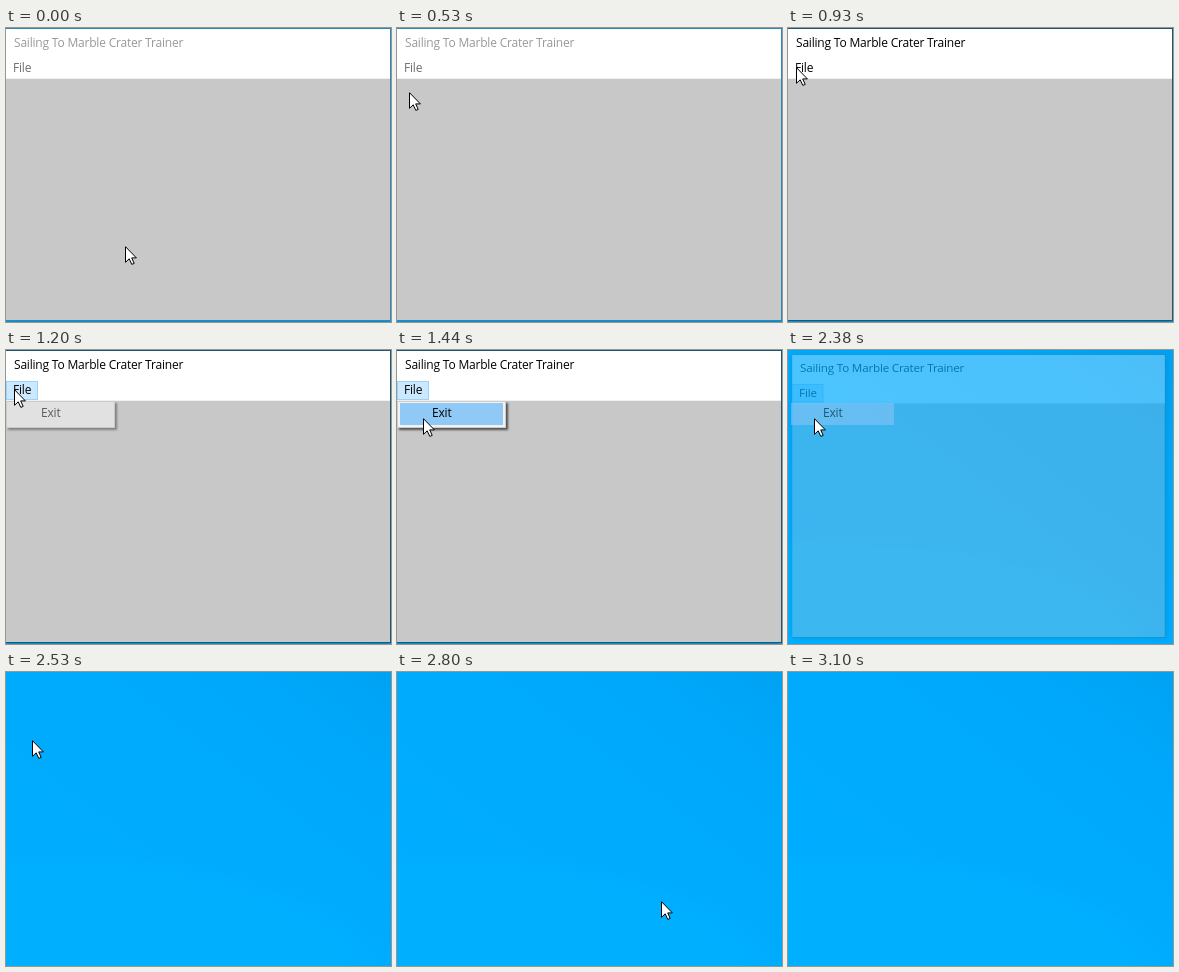
Recreate the animation shown at these times as an HTML page. Size 385 px wide and 294 px high, loop 3660 ms.

```html
<!DOCTYPE html>
<html lang="en">
<head>
<meta charset="utf-8">
<title>Closing a window</title>
<style>
html, body { margin: 0; width: 100%; height: 100%; overflow: hidden; }
body {
  position: relative;
  font: 12px/16px "Open Sans", "Noto Sans", sans-serif;
  color: #000;
  background:
    radial-gradient(ellipse 350px 132px at 50px 312px, #00b0ff 80%, #00b0ff00),
    linear-gradient(to top right, #00adff, #00abfe 45%, #00a8fb 80%, #00a2f3);
}
div, svg { position: absolute; box-sizing: border-box; }
.window, .bar, .title, .file, .frame, .item, .cursor {
  animation: 3660ms step-end infinite;
}

.window {
  left: 0; top: 0; width: 385px; height: 293px;
  background: #c8c8c8;
  border: 1px solid; border-left: 0;
  box-shadow: 0 1px 7px #0005;
  animation-name: window;
}
.bar {
  left: 0; top: 0; width: 384px; height: 50px;
  background: #fff;
  border-bottom: 1px solid #f0f0f0;
}
.title {
  left: 8px; top: 6px;
  white-space: nowrap; letter-spacing: -.2px;
  animation-name: title;
}
.file {
  left: 0; top: 30px; width: 32px; height: 19px;
  padding-left: 6px;
  border: 1px solid transparent;
  letter-spacing: -.2px;
  animation-name: file;
}
.frame {
  left: 0; top: 51px; width: 109px; height: 27px;
  border: 1px solid;
  box-shadow: 2px 2px 2px #0009;
  animation-name: frame;
}
.item {
  left: 3px; top: 53px; width: 103px; height: 22px;
  padding: 2px 0 0 32px;
  letter-spacing: -.2px;
  animation-name: item;
}
.cursor { left: 0; top: 0; animation-name: cursor; }

@keyframes window {
  0% { border-color: #2b8ab5; opacity: 1; transform: none; }
  25.409% { border-color: #1c5873; opacity: 1; transform: none; }
  65.027% { border-color: #1c5873; opacity: .3; transform: translate(-1.5px, -.5px) scale(.97); }
  69.125%, 100% { border-color: #1c5873; opacity: 0; transform: none; }
}
@keyframes title {
  0% { color: #999; }
  25.409%, 100% { color: #000; }
}
@keyframes file {
  0% { color: #6d6d6d; background: transparent; border-color: transparent; }
  25.409% { color: #000; background: transparent; border-color: transparent; }
  29.508%, 100% { color: #000; background: #cce8ff; border-color: #99d1ff; }
}
@keyframes frame {
  0% { opacity: 0; background: #f2f2f2; border-color: #ccc; }
  32.786% { opacity: .6; background: #f2f2f2; border-color: #ccc; }
  36.065% { opacity: 1; background: #f2f2f2; border-color: #ccc; }
  61.748% { opacity: 1; background: transparent; border-color: transparent; }
  65.027%, 100% { opacity: 0; background: transparent; border-color: transparent; }
}
@keyframes item {
  0% { opacity: 0; background: transparent; }
  32.786% { opacity: .6; background: transparent; }
  36.065% { opacity: 1; background: transparent; }
  39.344% { opacity: 1; background: #90c8f6; }
  61.748% { opacity: .85; background: #90c8f6; }
  65.027% { opacity: .52; background: #90c8f6; }
  69.125%, 100% { opacity: 0; background: #90c8f6; }
}
@keyframes cursor {
  0% { transform: translate(119px, 218px); opacity: 1; }
  3.278% { transform: translate(119px, 217px); }
  7.377% { transform: translate(48px, 146px); }
  11.202% { transform: translate(26px, 96px); }
  14.48% { transform: translate(12px, 64px); }
  17.759% { transform: translate(6px, 49px); }
  21.857% { transform: translate(8px, 39px); }
  36.065% { transform: translate(16px, 53px); }
  39.344% { transform: translate(26px, 68px); }
  73.224% { transform: translate(130px, 140px); }
  76.502% { transform: translate(264px, 229px); }
  80.601% { transform: translate(355px, 275px); opacity: 1; }
  84.699%, 100% { transform: translate(355px, 275px); opacity: 0; }
}
</style>
</head>
<body>
<div class="window">
  <div class="bar"></div>
  <div class="title">Sailing To Marble Crater Trainer</div>
  <div class="file">File</div>
</div>
<div class="frame"></div>
<div class="item">Exit</div>
<svg class="cursor" width="12" height="19">
  <path d="M.5 .7V16.3L4.2 12.8 6.8 18.4 9.2 17.4 6.7 11.9H11.4Z" fill="#fff" stroke="#000"/>
</svg>
</body>
</html>
```
